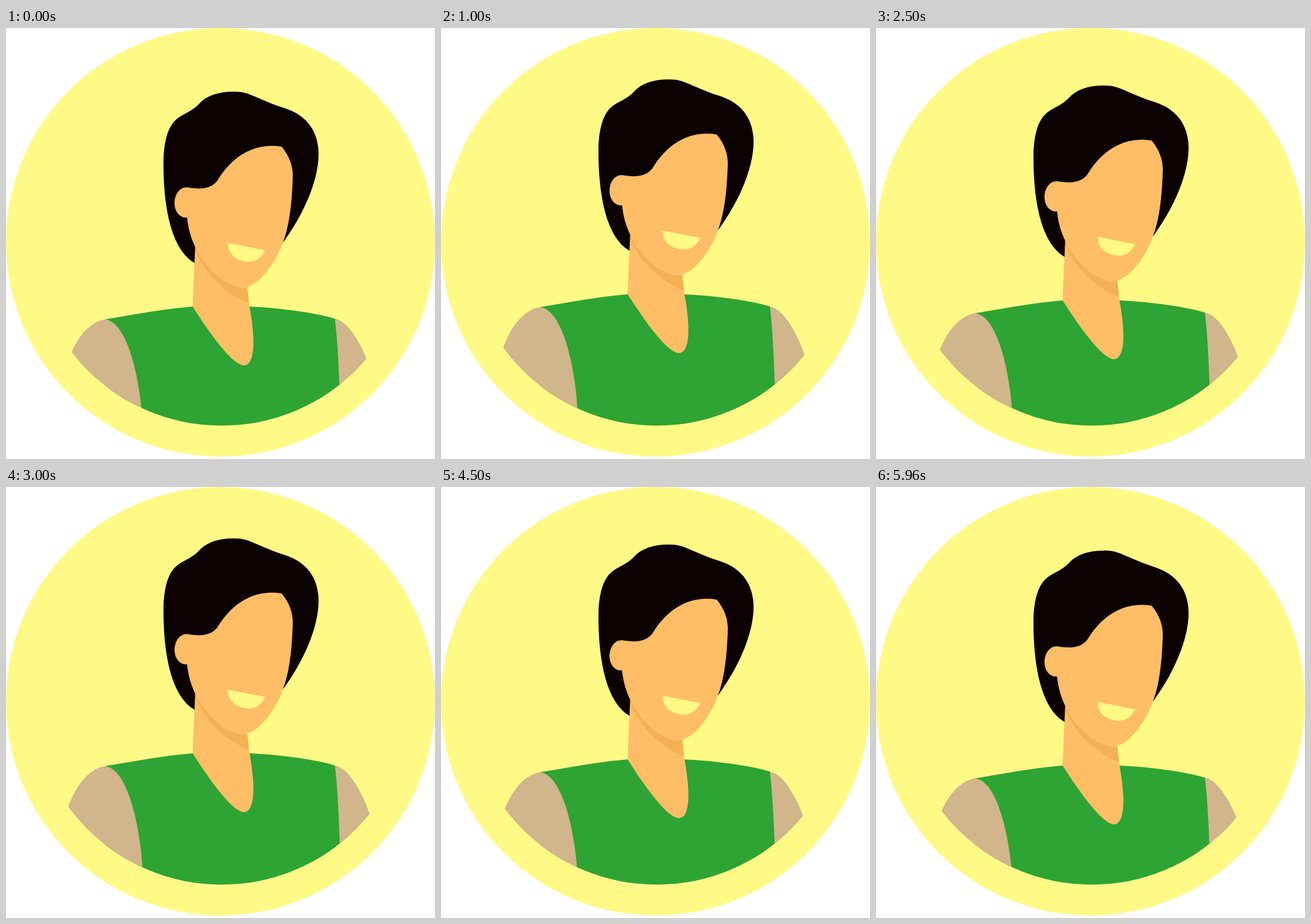
Recreate the animation shown at these times as an HTML page. Size 700x704 px, loop 6000 ms.

```html
<!DOCTYPE html>
<html lang="en">
<head>
<meta charset="utf-8">
<title>Bobbing avatar</title>
<style>
  html, body { margin: 0; width: 100%; height: 100%; overflow: hidden; background: #fff; }
  svg { display: block; width: 100%; height: 100%; }
</style>
</head>
<body>
<svg viewBox="0 0 700 704">
  <defs>
    <clipPath id="badge"><circle cx="352" cy="339.9" r="309.7"/></clipPath>
  </defs>
  <circle cx="350" cy="350" r="350" fill="#fff986"/>
  <g clip-path="url(#badge)">
    <g id="person">
      <!-- hair -->
      <path fill="#0b0100" d="M308 384C274 365 256 305 257 215C258 185 264 158 282 146C294 138 303 136 314 125C326 111 345 104 371 104C398 103 410 117 455 131C492 143 510 170 510 206C510 250 485 305 453 349L400 400H320Z"/>
      <!-- shirt -->
      <path fill="#2da433" d="M161 476C209 468 257 459 304 455H397C445 457 505 465 537 475L560 690H160Z"/>
      <!-- sleeves -->
      <path fill="#d1b58b" d="M161 476C192 478 213 545 221 621L226 690H80V600C90 570 98 549 107 529C119 502 138 480 161 476Z"/>
      <path fill="#d1b58b" d="M537 475C556 478 575 508 588 540L602 578V690H549L544 588Q542 525 537 475Z"/>
      <!-- neck -->
      <path fill="#ffbd66" d="M309 350L304.500 455C330 495 368 550 388 551C404 551 409 518 397 453L393 415Z"/>
      <path fill="#f3b054" d="M309 355L393 418L396.500 449C360 436 322 400 309 363Z"/>
      <!-- face and ear -->
      <path fill="#ffbd66" d="M300 261C320 264 338 262 347 246C372 207 408 187 450 194C463 210 468 226 468 241C467 280 463 322 452 350C440 385 413 420 388 424.500C362 424 325 395 309 358C302 344 297 327 295.500 309.500C284 311 275 300 275 286C275 272 284 257 300 261Z"/>
      <!-- smile -->
      <path fill="#fff986" d="M362 351L423 363C417 377 405 382 395 382C374 380 361 368 362 351Z"/>
    </g>
  </g>
</svg>
<script>
  const PERIOD = 2000;
  const RISE = 20;
  const person = document.getElementById("person");
  const start = performance.now();

  function draw(time) {
    const phase = 2 * Math.PI * (time % PERIOD) / PERIOD;
    const y = -RISE * (1 - Math.cos(phase)) / 2;
    person.setAttribute("transform", `translate(0 ${y.toFixed(3)})`);
  }

  function tick(now) {
    draw(Math.max(0, now - start));
    requestAnimationFrame(tick);
  }

  draw(0);
  requestAnimationFrame(tick);
</script>
</body>
</html>
```
